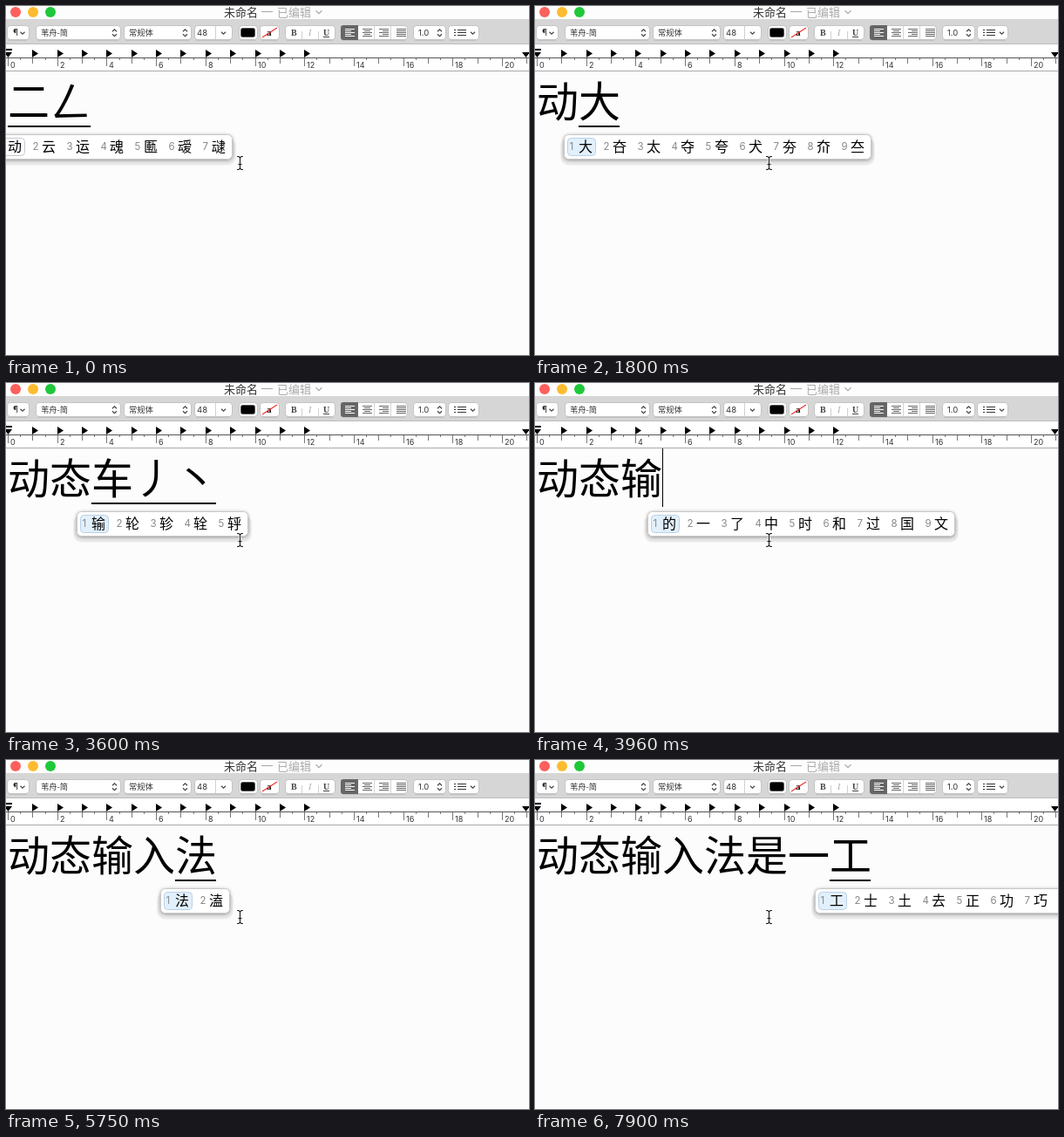
Write an HTML page with a canvas that moves like this. It is 600x400 px and loops after 8 s.

```html
<!DOCTYPE html>
<html lang="zh-CN">
<head>
<meta charset="utf-8">
<style>
html, body { margin: 0; width: 600px; height: 400px; overflow: hidden; }
canvas { display: block; }
</style>
</head>
<body>
<canvas id="stage" width="600" height="400"></canvas>
<script>
const ctx = document.getElementById('stage').getContext('2d');
const CJK = '"Noto Sans CJK SC", "Noto Sans CJK", sans-serif';
const LATIN = 'Inter, sans-serif';
const COMMON = '的一了中时和过国文';
const LOOP = 8000;

// [start ms, committed text, text being composed, candidates]
const steps = [
  [0, '', '二ㄥ', '动云运魂匭叆叇'],
  [360, '', '云', '云动运魂叆叇'],
  [720, '', '动', '动恸'],
  [1080, '动', '', COMMON],
  [1800, '动', '大', '大夻太夺夸犬夯夼夳'],
  [2160, '动态', '', COMMON],
  [2520, '动态', '一ㄥ', '车东练拣'],
  [2880, '动态', '车', '车输轮转轻较软轨辆'],
  [3240, '动态', '车丿', '输轿轮轶轸轷辁辎轫'],
  [3600, '动态', '车丿丶', '输轮轸辁轷'],
  [3960, '动态输', '', COMMON],
  [4320, '动态输', '入', '入人八个全从合会分'],
  [4680, '动态输入', '', COMMON],
  [5040, '动态输入', '氵', '没法海流清江河活深'],
  [5400, '动态输入', '氵土', '法清洁浩洼港涛溃澎'],
  [5750, '动态输入', '法', '法溘'],
  [6110, '动态输入法', '', '的一'],
  [6460, '动态输入法', '日', '日是时明最早星晚昨'],
  [6820, '动态输入法是', '一', '一下于十与三二万不'],
  [7540, '动态输入法是一', '一', '一下于十与三二万不'],
  [7900, '动态输入法是一', '工', '工士土去正功巧左项']
];

function rect(x, y, w, h, color) {
  ctx.fillStyle = color;
  ctx.fillRect(x, y, w, h);
}

function box(x, y, w, h, r, fill, stroke) {
  ctx.beginPath();
  ctx.roundRect(x, y, w, h, r);
  ctx.fillStyle = fill;
  ctx.fill();
  if (stroke) {
    ctx.strokeStyle = stroke;
    ctx.lineWidth = 1;
    ctx.stroke();
  }
}

function text(s, x, y, size, color = '#000', family = CJK, style = '') {
  ctx.font = `${style} ${size}px ${family}`;
  ctx.fillStyle = color;
  ctx.fillText(s, x, y);
}

function line(points, color = '#444', width = 1) {
  ctx.beginPath();
  points.forEach(([x, y]) => ctx.lineTo(x, y));
  ctx.strokeStyle = color;
  ctx.lineWidth = width;
  ctx.stroke();
}

function triangle(...points) {
  ctx.beginPath();
  points.forEach(([x, y]) => ctx.lineTo(x, y));
  ctx.fillStyle = '#000';
  ctx.fill();
}

function chevron(x, y, w = 2.5, dir = 1, color = '#444') {
  line([[x - w, y - dir * w / 2], [x, y + dir * w / 2], [x + w, y - dir * w / 2]], color, 1.2);
}

function stepper(x) {
  chevron(x, 28, 2.5, -1);
  chevron(x, 33.5);
}

function drawTitle() {
  rect(0, 0, 600, 15, '#fdfdfd');
  ['#fc605c', '#fdbc2f', '#1fc83a'].forEach((color, i) => {
    ctx.beginPath();
    ctx.arc(11 + 20 * i, 7, 6, 0, 7);
    ctx.fillStyle = color;
    ctx.fill();
  });
  text('未命名', 250, 12, 13, '#333', CJK, '500');
  text('—', 293, 11, 13, '#aaa', LATIN);
  text('已编辑', 311, 12, 13, '#aaa', CJK, '500');
  chevron(359, 7, 3.5, 1, '#aaa');
}

function drawToolbar() {
  rect(0, 15, 600, 29, '#d6d6d6');
  rect(0, 43, 600, 1, '#bdbdbd');
  const buttons = [[1, 26], [34, 131], [135, 212], [216, 259], [267, 288],
    [291, 313], [320, 377], [384, 460], [467, 504], [507, 542]];
  for (const [a, b] of buttons) {
    rect(a + 2, 38.5, b - a - 4, 1, '#b0b0b0');
    box(a + .5, 22.5, b - a, 16, 3.5, '#fff', '#c4c4c4');
  }
  text('¶', 8, 34, 10, '#333', LATIN);
  chevron(19, 31);
  text('苇舟-简', 40, 34, 9.3, '#333');
  stepper(124.5);
  text('常规体', 141, 34, 9.3, '#333');
  stepper(205.5);
  text('48', 219, 34, 9.5, '#333', LATIN);
  rect(240, 23, 1, 15, '#d0d0d0');
  chevron(249.5, 31);
  box(269.5, 25.5, 16, 10, 2, '#000', '#555');
  text('a', 299, 34, 11, '#000', '"Liberation Serif", serif', 'bold');
  line([[294, 36], [311, 25]], '#e33', 1.2);

  const serif = '"Liberation Serif", serif';
  text('B', 327, 34, 10, '#444', serif, 'bold');
  text('I', 347, 34, 10, '#aaa', serif, 'italic');
  text('U', 364, 34, 10, '#444', serif, 'bold');
  rect(364, 35, 7, 1, '#444');
  rect(339, 29, 1, 9, '#d0d0d0');
  rect(358, 29, 1, 9, '#d0d0d0');

  box(384, 22, 20, 17, [3, 0, 0, 3], '#666');
  for (let i = 0; i < 4; i++) {
    for (let row = 0; row < 5; row++) {
      const w = row % 2 && i < 3 ? 7 : 11;
      const x = 389 + 19.5 * i + (11 - w) * i / 2;
      rect(Math.round(x), 26 + 2 * row, w, 1, i ? '#666' : '#fff');
    }
    if (i > 1) rect(384 + 19 * i, 23, 1, 15, '#d4d4d4');
  }
  text('1.0', 473, 34, 9.5, '#333', LATIN);
  stepper(497.5);
  for (let y = 27; y < 35; y += 3) {
    rect(514, y, 2, 1, '#333');
    rect(518, y, 10, 1, '#333');
  }
  chevron(535.5, 31);
}

function drawRuler() {
  const cm = 28.35;
  rect(0, 44, 600, 31, '#fff');
  rect(0, 59, 600, 1, '#555');
  rect(0, 74, 600, 1, '#aaa');
  for (let i = 0; i < 43; i++) {
    const x = Math.round(2 + i * cm / 2);
    rect(x, 60, 1, i % 4 == 0 ? 9 : i % 2 ? 2 : 6, '#777');
    if (i % 4 == 0) text(String(i / 2), x + 3, 71, 9, '#333', LATIN);
  }
  for (let i = 1; i <= 12; i++) {
    const x = Math.round(2 + i * cm);
    triangle([x, 50], [x + 7, 54.5], [x, 59]);
  }
  rect(0, 49, 7, 2, '#000');
  triangle([-2, 53], [7, 53], [2.5, 59]);
  triangle([592, 53], [601, 53], [596.5, 59]);
}

function drawPanel(x, candidates) {
  const w = 39 * candidates.length + 2;
  ctx.save();
  ctx.shadowColor = 'rgba(0,0,0,.12)';
  ctx.shadowBlur = 2;
  box(x - 3, 152, w + 6, 30, 9, '#ebebeb');
  ctx.shadowColor = 'rgba(0,0,0,.45)';
  ctx.shadowBlur = 4;
  ctx.shadowOffsetY = 1;
  box(x + .5, 147.5, w - 1, 28, 5, '#fff');
  ctx.restore();
  box(x + .5, 147.5, w - 1, 28, 5, '#fff', '#c8c8c8');
  const [fill, edge] = x < 0 ? ['#fdfdfd', '#c3cad2'] : ['#e2f0fc', '#b9d0e6'];
  box(x + 4.5, 151.5, 32, 20, 4, fill, edge);
  [...candidates].forEach((char, i) => {
    const left = x + 39 * i;
    text(i + 1, left + 6.5, 165, 11.5, '#888', LATIN);
    text(char, left + 17, 167, 16, '#000', CJK, '500');
  });
}

function drawCursor() {
  const shape = [[[265, 172.5], [267, 172.5], [268.5, 174], [270, 172.5], [272, 172.5]],
    [[268.5, 174], [268.5, 186]],
    [[265, 187.5], [267, 187.5], [268.5, 186], [270, 187.5], [272, 187.5]],
    [[266.5, 181.5], [270.5, 181.5]]];
  shape.forEach(p => line(p, '#fff', 2.5));
  shape.forEach(p => line(p, '#222', 1.2));
}

function draw(now) {
  const t = now % LOOP;
  const [, done, composing, candidates] = steps.findLast(step => step[0] <= t);
  const x = 2 + 48 * done.length;
  rect(0, 0, 600, 400, '#fcfcfc');
  drawTitle();
  drawToolbar();
  drawRuler();
  [...done + composing].forEach((char, i) => text(char, 2 + 48 * i, 127, 48));
  if (composing) rect(x, 137, 48 * composing.length - 1, 2, '#000');
  else rect(x, 75, 1, 67, '#000');
  drawPanel(x - 17, candidates);
  drawCursor();
}

const start = performance.now();
function tick() {
  draw(performance.now() - start);
  requestAnimationFrame(tick);
}
tick();
</script>
</body>
</html>
```
